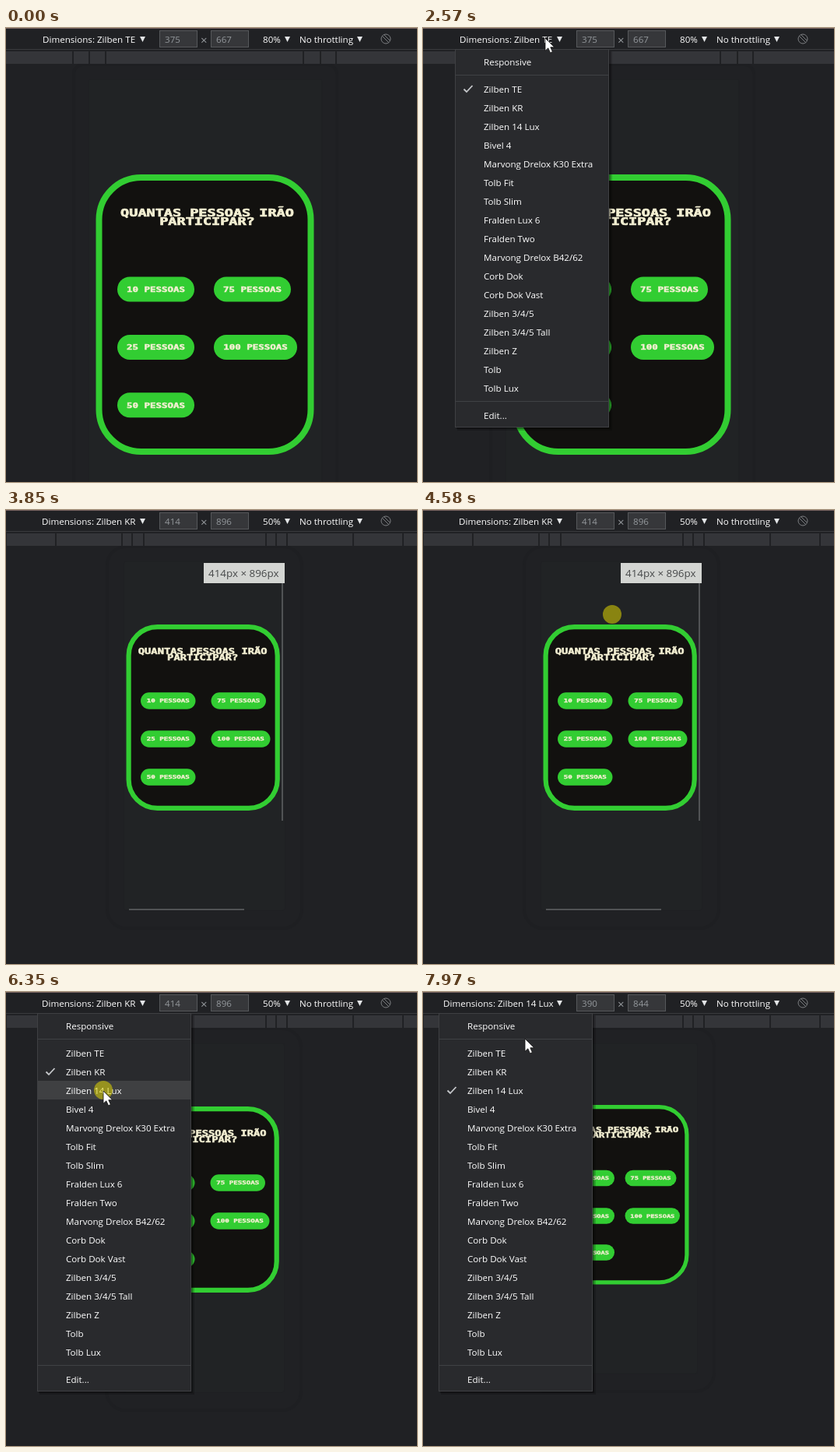
An HTML page for the animation above (8 s loop, 528 by 583 pixels).

```html
<!DOCTYPE html>
<html lang="en">
<head>
<meta charset="utf-8">
<title>Device toolbar</title>
<style>
  html, body { margin: 0; width: 100%; height: 100%; overflow: hidden; background: #202124; }
  svg { display: block; width: 100vw; height: 100vh; }
  text { font: 11.6px "Open Sans", "Noto Sans", sans-serif; fill: #fff; white-space: pre; }
  .dim { fill: #94989c; }
  .times { font-size: 15px; }
  .tip { font-size: 13.4px; fill: #47494a; }
  .wide { font-family: "DejaVu Sans Mono", monospace; font-weight: 700; fill: #f3efd2;
    stroke: #f3efd2; stroke-width: .05em; text-anchor: middle; }
</style>
</head>
<body>
<svg id="stage" viewBox="0 0 528 583"></svg>
<script>
const LOOP = 8000, TICK = 67.5;
const MENU = ['Zilben TE', 'Zilben KR', 'Zilben 14 Lux', 'Bivel 4', 'Marvong Drelox K30 Extra',
  'Tolb Fit', 'Tolb Slim', 'Fralden Lux 6', 'Fralden Two', 'Marvong Drelox B42/62', 'Corb Dok',
  'Corb Dok Vast', 'Zilben 3/4/5', 'Zilben 3/4/5 Tall', 'Zilben Z', 'Tolb', 'Tolb Lux'];

const halfGaps = [0, 64, 149, 162, 177, 334, 347, 361, 446, 510];
const DEVICES = [
  { w: 375, h: 667, zoom: '80%', labelX: 47, menuX: 41, gaps: [86, 107, 128, 382, 404, 424],
    page: [106, 66, 300, 534], shell: [87, 47, 338, 570, 12],
    card: [115.5, 188, 280, 360, 58, 8], title: [258.5, 241.8, 11.15],
    cols: [143, 267], rows: [335.5, 410, 484.3], pill: [99, 107, 32], em: 7.5 },
  { w: 414, h: 896, zoom: '50%', labelX: 46, menuX: 40, gaps: halfGaps,
    page: [151.5, 66, 207, 448], shell: [130, 47, 250, 490, 24],
    card: [154.5, 147, 197.3, 239, 40, 6.2], title: [252.7, 184.8, 8.3],
    cols: [173, 263.5], rows: [245, 294, 343], pill: [70.5, 76, 21.5], em: 5.5 },
  { w: 390, h: 844, zoom: '50%', labelX: 26, menuX: 20, gaps: halfGaps,
    page: [157.5, 66, 195, 424], shell: [134, 47, 240, 466, 24],
    card: [162.5, 145, 179, 230.5, 38, 5.2], title: [252.3, 179.8, 7.6],
    cols: [180, 259.5], rows: [239, 287.5, 334.5], pill: [66, 70.5, 20.5], em: 5.2 }
];

// cursor path: time, x, y
const PATH = [[330, 400, 545], [1090, 158, 17], [1150, 158, 16], [1350, 170, 50], [1700, 190, 262],
  [2090, 130, 10], [2290, 156, 12], [2430, 156, 12], [2570, 157, 13], [3320, 129, 103], [3650, 129, 103],
  [4180, 243, 135], [4720, 243, 135], [5080, 292, 122], [5420, 158, 13], [5580, 158, 13],
  [6080, 125, 127], [6480, 125, 127], [7080, 152, 14], [7450, 152, 13], [7900, 131, 60]];
const PRESSES = [[2420, 2550], [3450, 3650], [4450, 4700], [5460, 5590], [6270, 6470], [7350, 7480]];
const MENUS = [[2550, 3700], [5590, 6520], [7480, LOOP]];
const within = (t, spans) => spans.some(([a, b]) => t >= a && t < b);

const rect = (x, y, w, h, fill, extra = '') =>
  `<rect x="${x}" y="${y}" width="${w}" height="${h}" fill="${fill}" ${extra}/>`;
const text = (x, y, s, cls = '') => `<text x="${x}" y="${y}" class="${cls}">${s}</text>`;
const arrow = x => `<path d="M${x} 11h7l-3.5 7z" fill="#e4e6e8"/>`;

// blocky display face: one em per character
const wide = (x, y, em, s) =>
  `<text class="wide" transform="translate(${x} ${y}) scale(1.384 1)" style="font-size:${em * 1.2}px">${s}</text>`;

function toolbar(d, name) {
  const field = (x, v) => rect(x + .5, 3.5, 48, 21, '#36373a', 'stroke="#56585b"') + text(x + 7, 19, v, 'dim');
  return rect(0, 0, 528, 28, '#202124') + rect(0, 0, 528, 1, '#75605f') + rect(0, 27, 528, 1, '#393a3d') +
    text(d.labelX, 19, 'Dimensions: ' + name) + arrow(172) +
    field(197, d.w) + text(250, 21, '×', 'dim times') + field(263, d.h) +
    text(330, 19, d.zoom) + arrow(358) + text(377, 19, 'No throttling') + arrow(451) +
    '<g fill="none" stroke="#7c7e81"><circle cx="488" cy="14" r="6"/>' +
    '<path d="M483 10l9 9M485.5 8.5l7.5 7.5"/></g>';
}

function page(d) {
  const [px, py, pw, ph] = d.page, [sx, sy, sw, sh, sr] = d.shell;
  const [x, y, w, h, r, b] = d.card, [tx, ty, em] = d.title, [pill, pill3, tall] = d.pill;
  const button = (col, row, n) => {
    const bw = n > 99 ? pill3 : pill, cy = d.rows[row];
    return rect(d.cols[col], cy - tall / 2, bw, tall, '#32cd32', `rx="${tall / 2}"`) +
      wide(d.cols[col] + bw / 2, cy + d.em * .43, d.em, n + ' PESSOAS');
  };
  return rect(sx, sy, sw, sh, 'none', `rx="${sr}" stroke="#1e1f22" stroke-width="4"`) +
    rect(px, py, pw, ph, '#212325', 'rx="3" stroke="#1f2023"') +
    rect(x + b / 2, y + b / 2, w - b, h - b, '#12110f', `rx="${r - b / 2}" stroke="#32cd32" stroke-width="${b}"`) +
    wide(tx, ty, em, 'QUANTAS PESSOAS IRÃO') + wide(tx, ty + em, em, 'PARTICIPAR?') +
    button(0, 0, 10) + button(1, 0, 75) + button(0, 1, 25) + button(1, 1, 100) + button(0, 2, 50);
}

function ruler(d) {
  return rect(0, 30, 528, 16, '#343539') + d.gaps.map(x => rect(x - 1, 30, 2, 16, '#202124')).join('');
}

function menu(d, chosen, hover) {
  const x = d.menuX, tx = x + 37, cy = 78.5 + 24 * chosen;
  return rect(x + 3, 30, 199, 487, '#000', 'opacity=".2"') + rect(x + 2, 30, 198, 485, '#000', 'opacity=".3"') +
    rect(x + .5, 27.5, 197, 485, '#292a2d', 'stroke="#3f4043"') +
    (hover >= 0 ? rect(x + 1, 90 + 24 * (hover - 1), 196, 24, '#3f4042') : '') +
    [60, 479].map(y => rect(x + 1, y, 196, 1, '#3f4144')).join('') +
    text(tx, 48, 'Responsive') + MENU.map((s, i) => text(tx, 82.7 + 24 * i, s)).join('') + text(tx, 501.7, 'Edit...') +
    `<path d="M${x + 11.5} ${cy}l3.5 3.5 7.5-8" fill="none" stroke="#c5c7ca" stroke-width="1.8"/>`;
}

const sizeHint = rect(254, 68, 104, 26, '#d3d5d2') + text(260, 86, '414px × 896px', 'tip') +
  rect(354, 94, 2, 305, '#515355') + rect(158, 512, 148, 2, '#515355');
const pointer = '<path d="M0 0V16.3L3.8 12.8 6.5 18.8 9.4 17.5 6.8 11.7H11.8Z" fill="#fff" stroke="#111" stroke-width=".8"/>';

function cursorAt(t) {
  const i = PATH.findIndex(k => k[0] > t);
  if (i === 0) return PATH[0].slice(1);
  if (i < 0) return PATH[PATH.length - 1].slice(1);
  const [t0, x0, y0] = PATH[i - 1], [t1, x1, y1] = PATH[i];
  const u = (t - t0) / (t1 - t0), e = u * u * (3 - 2 * u);
  return [x0 + (x1 - x0) * e, y0 + (y1 - y0) * e];
}

const stage = document.getElementById('stage');
stage.innerHTML = '<g></g><g></g>';
const [scene, mouse] = stage.children;
let lastKey = '';

function draw(t) {
  t = Math.floor((t + 12) / TICK) * TICK;
  const [x, y] = cursorAt(t);
  const id = t < 3770 ? 0 : t < 6600 ? 1 : 2, d = DEVICES[id];
  const open = within(t, MENUS), hint = t >= 3770 && t < 4700;
  const row = Math.floor((y - 66) / 24);
  const hover = open && row >= 0 && row < MENU.length ? row : -1;
  const nudge = id === 1 && t >= 4700 ? -1 : 0;

  const key = [id, open, hint, hover, nudge].join();
  if (key !== lastKey) {
    lastKey = key;
    scene.innerHTML = rect(0, 0, 528, 583, '#202124') + `<g transform="translate(${nudge})">${page(d)}</g>` +
      ruler(d) + toolbar(d, MENU[id]) + (hint ? sizeHint : '') + (open ? menu(d, id, hover) : '');
  }

  const [px, py, pw, ph] = d.page;
  const touch = !open && x > px && x < px + pw && y > py && y < py + ph;
  const press = within(t, PRESSES);
  mouse.innerHTML = (press ? `<circle cx="${x}" cy="${y - 1}" r="12" fill="#e6dc00" opacity=".53"/>` : '') +
    (touch ? '' : `<g transform="translate(${x} ${y})">${pointer}</g>`);
}

const start = performance.now();
function frame() {
  draw((performance.now() - start) % LOOP);
  requestAnimationFrame(frame);
}
frame();
</script>
</body>
</html>
```
